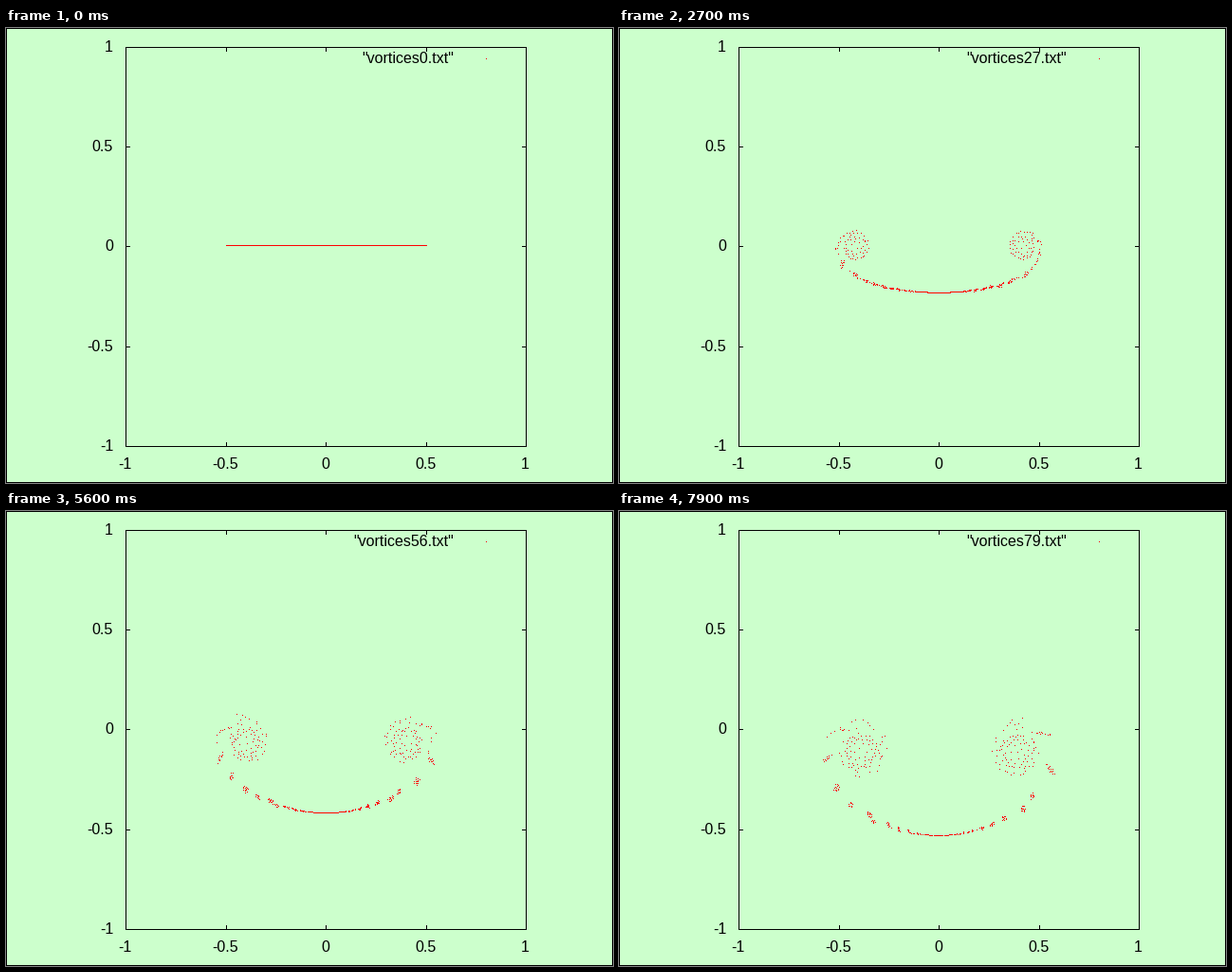
A matplotlib script for the animation above (8 s loop, 640 by 480 pixels).

```python
import numpy as np
import matplotlib.pyplot as plt
from matplotlib.animation import FuncAnimation
from matplotlib.patches import Rectangle

W, H, DPI = 640, 480, 100
FRAMES, INTERVAL = 80, 100
LEFT, RIGHT, TOP, BOTTOM = 126, 548, 20, 441

N = 401             # point vortices along the sheet
SINK = 0.0095       # initial downwash per frame
SUBSTEPS = 3
CORE = 1e-7         # squared core radius, tames close encounters


def roll_up():
    """Vortex sheet behind an elliptically loaded wing, Euler steps."""
    rng = np.random.default_rng(7)
    x = np.linspace(-0.5, 0.5, N)
    edges = np.concatenate(([-0.5], (x[1:] + x[:-1]) / 2, [0.5]))
    load = SINK * np.sqrt(np.maximum(1 - 4 * edges**2, 0))
    gamma = -np.diff(load) / (2 * np.pi * SUBSTEPS)
    y = rng.normal(0, 1e-11, N)
    states = []
    for _ in range(FRAMES):
        states.append((x.copy(), y.copy()))
        for _ in range(SUBSTEPS):
            dx = x[:, None] - x
            dy = y[:, None] - y
            r2 = dx * dx + dy * dy + CORE
            x = x - (dy / r2) @ gamma
            y = y + (dx / r2) @ gamma
    return states


def to_pixels(x, y):
    return np.floor(337.5 + 211 * x), np.floor(230.5 - 210.5 * y)


fig = plt.figure(figsize=(W / DPI, H / DPI), dpi=DPI, facecolor="#ccffcc")
ax = fig.add_axes([0, 0, 1, 1])
ax.set_xlim(0, W)
ax.set_ylim(H, 0)
ax.axis("off")


def bar(x, y, w, h):
    ax.add_patch(Rectangle((x, y), w, h, color="black", linewidth=0,
                           antialiased=False))


def box(x0, y0, x1, y1):
    for y in (y0, y1):
        bar(x0, y, x1 - x0 + 1, 1)
    for x in (x0, x1):
        bar(x, y0, 1, y1 - y0 + 1)


def label(x, y, s, ha):
    return ax.text(x, y, s, ha=ha, va="baseline", color="black",
                   family="Liberation Sans", fontsize=16 * 72 / DPI)


box(0, 0, W - 1, H - 1)
box(LEFT, TOP, RIGHT, BOTTOM)

names = ["-1", "-0.5", "0", "0.5", "1"]
for name, tx, ty in zip(names, (126, 232, 337, 443, 548),
                        (441, 336, 230, 125, 20)):
    bar(tx, TOP, 1, 5)
    bar(tx, BOTTOM - 4, 1, 5)
    bar(LEFT, ty, 5, 1)
    bar(RIGHT - 4, ty, 5, 1)
    label(tx - 0.5, 465, name, "center")
    label(113, ty + 5, name, "right")

title = label(472, 37, "", "right")
dot_style = dict(linestyle="none", marker=",", color="#ff0000",
                 antialiased=False)
ax.plot([506], [33], **dot_style)
dots, = ax.plot([], [], **dot_style)

states = roll_up()


def draw(i):
    dots.set_data(*to_pixels(*states[i]))
    title.set_text(f'"vortices{i}.txt"')
    return dots, title


anim = FuncAnimation(fig, draw, frames=FRAMES, interval=INTERVAL,
                     repeat=True, repeat_delay=0)
plt.show()
```
